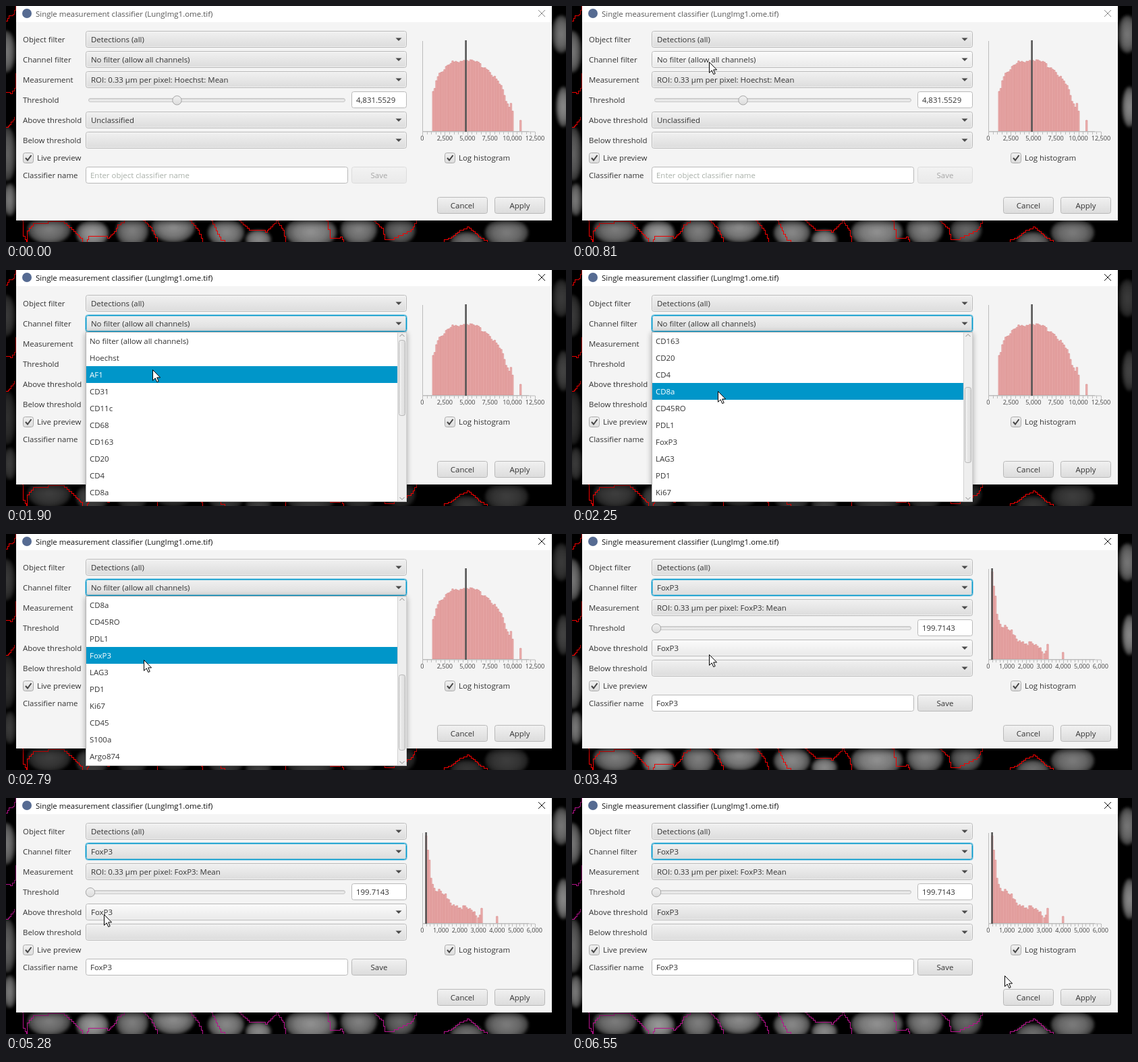
Recreate the animation shown at these times as an HTML page. Size 830 by 351 pixels, loop 6620 ms.

```html
<!DOCTYPE html>
<html lang="en">
<head>
<meta charset="utf-8">
<title>Single measurement classifier</title>
<style>
html, body { margin: 0; width: 100%; height: 100%; overflow: hidden; background: #000; }
svg { display: block; }
text { font: 11.45px "Open Sans", "Noto Sans", sans-serif; white-space: pre; }
.tick { font-size: 9.2px; text-anchor: middle; }
.mid { text-anchor: middle; }
.crisp { shape-rendering: crispEdges; }
</style>
</head>
<body>
<svg id="stage" width="830" height="351" viewBox="0 0 830 351">
  <defs>
    <linearGradient id="face" x2="0" y2="1"><stop stop-color="#f1f1f1"/><stop offset="1" stop-color="#dcdcdc"/></linearGradient>
    <linearGradient id="hover" x2="0" y2="1"><stop stop-color="#fbfbfb"/><stop offset="1" stop-color="#e9e9e9"/></linearGradient>
    <linearGradient id="press" x2="0" y2="1"><stop stop-color="#dedede"/><stop offset="1" stop-color="#c9c9c9"/></linearGradient>
    <linearGradient id="track" x2="0" y2="1"><stop stop-color="#d6d6d6"/><stop offset="1" stop-color="#f6f6f6"/></linearGradient>
    <linearGradient id="thumb"><stop stop-color="#f2f2f2"/><stop offset="1" stop-color="#dadada"/></linearGradient>
    <radialGradient id="cell"><stop stop-color="#a2a2a2"/><stop offset=".6" stop-color="#858585"/><stop offset="1" stop-color="#4c4c4c"/></radialGradient>
    <filter id="soft" x="-20%" y="-20%" width="140%" height="140%"><feGaussianBlur stdDeviation="2.2"/></filter>
    <filter id="shade" x="-10%" y="-10%" width="120%" height="120%"><feGaussianBlur stdDeviation="4"/></filter>
  </defs>
  <g id="back"></g>
  <g id="dialog"></g>
  <path id="cursor" d="M0.5 0.5V16.3L4.2 12.8L6.8 18.6L9.2 17.5L6.7 11.9H11.6Z" fill="#fff" stroke="#000"/>
</svg>
<script>
const LOOP = 6620;
const $ = id => document.getElementById(id);

// Bursts of picture changes: first time, last time, number of steps
const bursts = [
  [0, 0, 1], [130, 400, 5], [600, 810, 4], [1210, 1280, 2], [1550, 2180, 10], [2250, 2250, 1],
  [2450, 2790, 6], [2930, 3080, 3], [3150, 3430, 5], [3570, 3570, 1], [3770, 4390, 10],
  [4460, 5080, 10], [5140, 5780, 10], [5850, 6480, 10], [6550, 6550, 1]
];
const steps = bursts.flatMap(([a, b, n]) =>
  Array.from({ length: n }, (_, i) => Math.round((a + (n > 1 ? (b - a) * i / (n - 1) : 0)) / 10) * 10));

// Pointer path: time, x, y
const route = [
  [130, 654, 335], [400, 262, 121], [600, 252, 112], [810, 203, 83], [1480, 203, 83],
  [1820, 216, 135], [2040, 219, 172], [2180, 216, 179], [2250, 216, 180], [2450, 214, 181],
  [2790, 204, 187], [3080, 203, 180], [3760, 203, 179], [3980, 192, 150], [4180, 215, 114],
  [4320, 241, 122], [4390, 262, 120], [4600, 520, 90], [4670, 618, 104], [4860, 400, 120],
  [5010, 90, 150], [5080, 66, 176], [5140, 45, 176], [5210, 31, 170], [5280, 145, 173],
  [5420, 210, 180], [5560, 150, 203], [5780, 100, 243], [5850, 92, 246], [6060, 260, 252],
  [6270, 460, 250], [6400, 598, 254], [6480, 541, 248], [6550, 641, 264]
];

const channels = ["No filter (allow all channels)", "Hoechst", "AF1", "CD31", "CD11c", "CD68", "CD163", "CD20",
  "CD4", "CD8a", "CD45RO", "PDL1", "FoxP3", "LAG3", "PD1", "Ki67", "CD45", "S100a", "Argo874"];

function between(keys, t) {
  if (t <= keys[0][0]) return keys[0].slice(1);
  const i = keys.findIndex(k => k[0] >= t);
  if (i < 0) return keys[keys.length - 1].slice(1);
  const a = keys[i - 1], b = keys[i], f = (t - a[0]) / (b[0] - a[0]);
  return a.slice(1).map((v, j) => v + (b[j + 1] - v) * f);
}

// ---- drawing helpers ----
const text = (x, y, s, fill = "#333", cls = "") => `<text x="${x}" y="${y}" fill="${fill}" class="${cls}">${s}</text>`;
const box = (x, y, w, h, fill, extra = "") => `<rect x="${x}" y="${y}" width="${w}" height="${h}" fill="${fill}" ${extra}/>`;
const framed = (x, y, w, h, fill, line = "#b9b9b9") =>
  box(x + .5, y + .5, w - 1, h - 1, fill, `rx="3" stroke="${line}"`);
const inside = (p, x, y, w, h) => p && p[0] >= x && p[0] < x + w && p[1] >= y && p[1] < y + h;

function combo(y, label, value, s, focus) {
  const over = !s.open && inside(s.pointer, 118, y, 476, 25);
  const fill = focus && s.pressed ? "press" : over ? "hover" : "face";
  return text(25, y + 17, label) + (focus ? box(117.5, y - .5, 477, 26, "none", 'rx="4" stroke="#8fd0e8"') : "") +
    framed(118, y, 476, 25, `url(#${fill})`, focus ? "#0096c9" : "#b9b9b9") +
    box(119.5, y + 1.5, 473, 22, "none", `rx="2" stroke="${focus ? "#58b9da" : "#f8f8f8"}" stroke-opacity=".7"`) +
    text(126, y + 17, value) + `<path d="M577.5 ${y + 10.5}h9l-4.5 4.5z" fill="#4a4a4a"/>`;
}

function button(x, y, w, label, s, off) {
  const over = !off && inside(s.pointer, x, y, w, 25);
  return `<g opacity="${off ? .4 : 1}">` + framed(x, y, w, 25, `url(#${over ? "hover" : "face"})`) +
    text(x + w / 2, y + 17, label, "#333", "mid") + "</g>";
}

const check = (x, label) => framed(x, 218, 16, 16, "url(#face)", "#aaa") +
  `<path d="M${x + 4} 226l3 3.5l5.5 -7.5" fill="none" stroke="#444" stroke-width="2"/>` + text(x + 21, 230, label);

// Small repeatable wobble for bar heights
const wobble = i => Math.sin(i * 12.9898) * 43758.5453 % 1;

function bars(from, to, keys, rough, extra) {
  let d = "";
  const bar = (x, y) => { d += `M${x.toFixed(1)} 186V${y.toFixed(1)}h2.4V186z`; };
  for (let x = from, i = 0; x < to; x += 2.4, i++) bar(x, Math.min(185, between(keys, x)[0] + wobble(i) * rough));
  extra.forEach(([x, y]) => bar(x, y));
  return `<path d="${d}" fill="#ecb1b0" stroke="#d88c8b" stroke-width=".7"/>`;
}

const wide = bars(632, 751, [[632, 127], [635, 118], [638, 106], [641, 99], [648, 95], [655, 88], [661, 84],
  [672, 81], [682, 79], [690, 83], [699, 86], [709, 91], [716, 97], [724, 107], [733, 120], [738, 135],
  [743, 146], [746, 151], [748, 140], [751, 170]], 3, [[761.5, 170]]);
const narrow = bars(621.6, 692, [[621, 52], [624, 72], [627, 97], [629, 118], [632, 129], [638, 138],
  [646, 143], [655, 152], [664, 157], [672, 160], [680, 166], [692, 174]], 6,
  [[693, 169], [695.4, 175], [699, 178], [701.4, 174], [703.8, 164], [726.6, 176]]);

function chart(fox) {
  const n = fox ? 6 : 5, gap = fox ? 27.75 : 33.4;
  let out = fox ? narrow : wide, ticks = "";
  for (let i = 0; i <= n * 5; i++) ticks += `M${Math.round(617 + i * gap / 5) + .5} 187v${i % 5 ? 4 : 6}`;
  out += `<path d="M617.5 52V186.5H775M617 187H784${ticks}" fill="none" stroke="#bcbcbc"/>`;
  for (let i = 0; i <= n; i++)
    out += text(617 + i * gap, 200, (i * (fox ? 1000 : 2500)).toLocaleString("en-US"), "#444", "tick");
  return out + box(fox ? 621.3 : 680.3, 51, 2.6, 136, "#555");
}

// ---- tissue behind the dialog ----
const cells = [
  [64, 332, 32, 22], [128, 338, 24, 20], [187, 334, 24, 24], [248, 328, 32, 24], [326, 337, 27, 21],
  [374, 347, 19, 14], [452, 336, 38, 24], [523, 332, 27, 24], [584, 333, 23, 21], [683, 350, 24, 14],
  [742, 337, 32, 22], [0, 68, 15, 31], [2, 220, 14, 40], [6, 288, 11, 24], [823, 42, 15, 28], [826, 150, 11, 30]
];
const outlines = [
  "24 319 25 342 30 351", "28 351 31 334 40 323 62 320 86 323 100 335 110 345 113 351",
  "118 351 122 342 150 345 160 335 165 325 175 319", "203 319 214 329 221 344 224 351",
  "272 319 284 333 291 351", "304 319 311 334 318 348 324 351", "345 319 360 333 384 336 400 320",
  "400 319 410 333 414 351", "474 319 480 345 495 343 500 351", "545 320 556 330 561 347 575 344 600 332 608 319",
  "648 351 649 347 660 343 672 333 683 328 692 335 703 345 713 351",
  "0 22 4 14 10 12 14 0", "0 128 6 130 12 122 14 100", "0 180 5 176 12 165"
];

function stair(points) {
  const p = points.split(" ").map(Number);
  let d = `M${p[0]} ${p[1]}`;
  for (let i = 2; i < p.length; i += 2) {
    const dx = p[i] - p[i - 2], dy = p[i + 1] - p[i - 1];
    const n = Math.max(1, Math.ceil(Math.min(Math.abs(dx), Math.abs(dy)) / 3));
    for (let k = 1; k <= n; k++)
      d += `H${Math.round(p[i - 2] + dx * k / n)}V${Math.round(p[i - 1] + dy * k / n)}`;
  }
  return d;
}

const tissue = cells.map(([x, y, rx, ry], i) =>
  `<ellipse cx="${x}" cy="${y}" rx="${rx}" ry="${ry}" fill="url(#cell)" opacity="${.78 + wobble(i) * .2}" filter="url(#soft)"/>`).join("");
const lines = outlines.map(stair).join("");

const backdrop = s => `<g opacity="${s.open ? .5 : 1}">${tissue}</g>` +
  `<path class="crisp" d="${lines}" fill="none" stroke="${s.t >= 3570 ? "#b5128c" : "#f00000"}"/>` +
  box(13, -10, 798, 332, "#000", 'opacity=".6" filter="url(#shade)"');

// ---- dropdown list ----
function popup(s) {
  let out = box(118, 94, 476, 252, "#000", 'opacity=".35" filter="url(#shade)"') +
    box(118.5, 92.5, 475, 252, "#fff", 'stroke="#b5b5b5"');
  const hot = inside(s.pointer, 118, 93, 476, 250) ? Math.floor((s.pointer[1] - 93) / 25) + s.scroll : 0;
  for (let i = 0; i < 10; i++) {
    const n = i + s.scroll, y = 93 + i * 25;
    if (n === hot) out += box(119, y, 461, 25, "#0096c9");
    out += text(124, y + 17, channels[n] || "", n === hot ? "#fff" : "#333");
  }
  const top = 104 + s.scroll * 11.67;
  return out + box(580.5, 93, 13, 251, "#eee", 'stroke="#d2d2d2"') +
    framed(582, top, 10, 113, "url(#thumb)", "#b4b4b4") +
    '<path d="M583.5 99l3.5 -3.5l3.5 3.5M583.5 338l3.5 3.5l3.5 -3.5" fill="none" stroke="#888"/>';
}

function dialog(s) {
  const ink = s.active ? "#111" : "#555", fox = s.measured;
  const fields = [
    combo(37, "Object filter", "Detections (all)", s),
    combo(67, "Channel filter", s.chosen ? "FoxP3" : channels[0], s, s.active),
    combo(97, "Measurement", `ROI: 0.33 µm per pixel: ${fox ? "FoxP3" : "Hoechst"}: Mean`, s),
    combo(157, "Above threshold", s.named ? "FoxP3" : "Unclassified", s),
    combo(187, "Below threshold", "", s)
  ].join("");
  return box(15, 0, 794, 319, "#f4f4f4") + box(15, 0, 794, 24, "#fff") +
    '<circle cx="31" cy="11" r="7" fill="#566b92"/>' +
    text(44, 16, "Single measurement classifier (LungImg1.ome.tif)", ink) +
    `<path d="M789 6l10 10M799 6l-10 10" stroke="${s.active ? "#111" : "#888"}"/>` + fields +
    text(25, 144, "Threshold") + box(122.5, 137.5, 380, 5, "url(#track)", 'rx="2.5" stroke="#c3c3c3"') +
    `<circle cx="${fox ? 125 : 253.5}" cy="140.3" r="6.7" fill="url(#face)" stroke="#a5a5a5"/>` +
    framed(512, 127, 82, 25, "#fff") + text(519, 144, fox ? "199.7143" : "4,831.5529") +
    check(25, "Live preview") + check(650, "Log histogram") +
    text(25, 256, "Classifier name") + framed(118, 239, 389, 25, "#fff") +
    text(125, 256, s.named ? "FoxP3" : "Enter object classifier name", s.named ? "#333" : "#a9b0a9") +
    button(512, 239, 82, "Save", s, !s.named) + button(639, 284, 75, "Cancel", s) + button(724, 284, 75, "Apply", s) +
    chart(fox) + (s.open ? popup(s) : "");
}

function stateAt(t) {
  return {
    t,
    pointer: t < 130 ? null : between(route, t).map(Math.round),
    active: t >= 1210,
    pressed: t >= 1210 && t < 1550,
    open: t >= 1280 && t < 3150,
    scroll: t < 1960 ? 0 : t < 2110 ? 3 : t < 2580 ? 6 : 9,
    chosen: t >= 3150,
    measured: t >= 3290,
    named: t >= 3360
  };
}

let shown = -1;
function draw(now) {
  const t = now % LOOP;
  const step = steps.filter(v => v <= t).pop();
  if (step !== shown) {
    shown = step;
    const s = stateAt(step);
    $("back").innerHTML = backdrop(s);
    $("dialog").innerHTML = dialog(s);
    $("cursor").style.display = s.pointer ? "" : "none";
    if (s.pointer) $("cursor").setAttribute("transform", `translate(${s.pointer})`);
  }
}

const start = performance.now();
function tick() {
  draw(performance.now() - start);
  requestAnimationFrame(tick);
}
tick();
</script>
</body>
</html>
```
